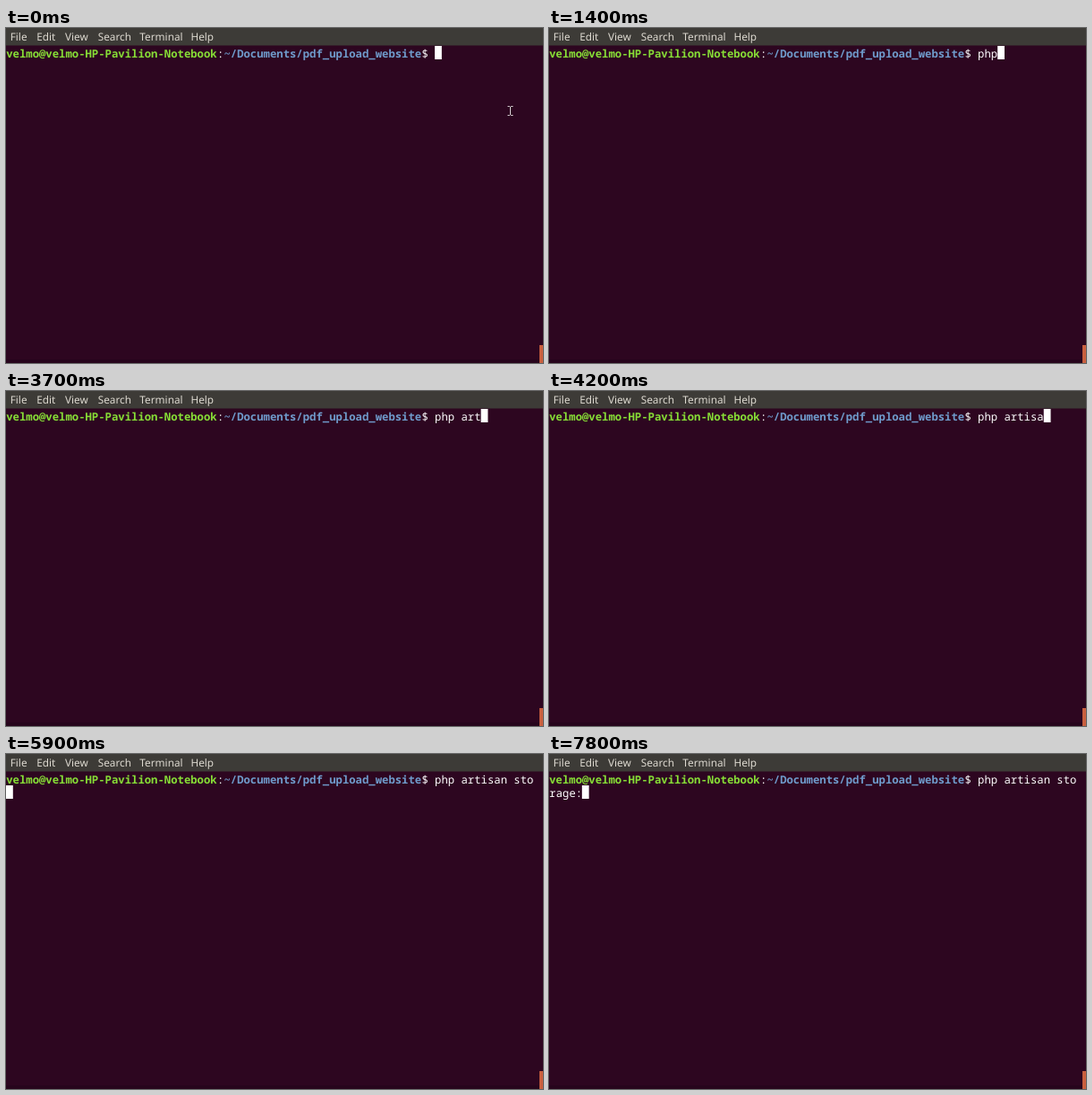
Animation of 600 by 374 pixels, one loop 8 s. Source, as an HTML page:

```html
<!DOCTYPE html>
<html lang="en">
<head>
<meta charset="utf-8">
<title>Terminal</title>
<style>
  html, body { margin: 0; width: 100%; height: 100%; overflow: hidden; background: #2d0620; }
  svg { display: block; width: 600px; height: 374px; }
  text { white-space: pre; text-rendering: geometricPrecision; }
  .menu { font: 11.8px "Noto Sans", "Open Sans", sans-serif; fill: #dcd8cf; }
  .term { font: 12.28px "Noto Sans Mono", "DejaVu Sans Mono", monospace; fill: #fff; }
  .user { font-weight: bold; fill: #87de36; }
  .path { font-weight: bold; fill: #6f9bcb; }
</style>
</head>
<body>
<svg viewBox="0 0 600 374">
  <rect width="600" height="374" fill="#2d0620"/>
  <rect y="370" width="600" height="4" fill="#27051c"/>
  <rect width="600" height="19.5" fill="#3d3b37"/>
  <rect x="596" y="354" width="4" height="20" fill="#c9603f"/>
  <g id="menu" class="menu"></g>
  <rect id="cursor" width="7.8" height="15" fill="#fff"/>
  <g id="prompt" class="term"></g>
  <g class="term">
    <text id="line1"></text>
    <text id="line2"></text>
  </g>
  <g id="pointer" fill="none">
    <path d="M560.5 87.5h2.2l.8 1 .8-1h2.2M563.5 88v9M560.5 97.5h2.2l.8-1 .8 1h2.2" stroke="#d8d0d5"/>
  </g>
</svg>
<script>
const LOOP = 8000, CELL = 7.37, ROW = 15, COLS = 80, BASE = 32.7;
const COMMAND = "php artisan storage:";
const KEYS = [1000, 1200, 1300, 1700, 2100, 3500, 3700, 3900, 4000, 4100,
              4300, 4500, 5300, 5500, 5700, 6000, 6200, 7300, 7500, 7700];
const MENU = [["File", 4.7], ["Edit", 34.2], ["View", 66], ["Search", 102.7], ["Terminal", 149.3], ["Help", 206.4]];
const PROMPT = [["velmo@velmo-HP-Pavilion-Notebook", "user"], [":", ""],
                ["~/Documents/pdf_upload_website", "path"], ["$", ""]];
const $ = id => document.getElementById(id);

function addText(parent, text, x, y, cls = "") {
  const el = document.createElementNS("http://www.w3.org/2000/svg", "text");
  el.textContent = text;
  el.setAttribute("class", cls);
  place(el, x, y);
  parent.append(el);
}

function place(el, x, y) {
  el.setAttribute("x", x);
  el.setAttribute("y", y);
}

for (const [label, x] of MENU) addText($("menu"), label, x, 14.1);

let start = 0;
for (const [text, cls] of PROMPT) {
  addText($("prompt"), text, start * CELL + 0.2, BASE, cls);
  start += text.length;
}
start++;

const firstRow = COLS - start;
place($("line1"), start * CELL, BASE);
place($("line2"), 0.3, BASE + ROW);

// The cursor stays lit for a while after each key, then blinks.
function cursorOn(t, typed) {
  if (!typed) return t < 200 || t >= 800;
  return (t - KEYS[typed - 1]) % 1200 < 500;
}

function draw(t) {
  const typed = KEYS.filter(k => k <= t).length;
  const shown = COMMAND.slice(0, typed);
  $("line1").textContent = shown.slice(0, firstRow);
  $("line2").textContent = shown.slice(firstRow);
  const cell = start + typed;
  place($("cursor"), (cell % COLS) * CELL, 20 + Math.floor(cell / COLS) * ROW);
  $("cursor").style.visibility = cursorOn(t, typed) ? "visible" : "hidden";
  $("pointer").style.visibility = typed ? "hidden" : "visible";
}

const begin = performance.now();
function tick() {
  draw((performance.now() - begin) % LOOP);
  requestAnimationFrame(tick);
}
tick();
</script>
</body>
</html>
```
